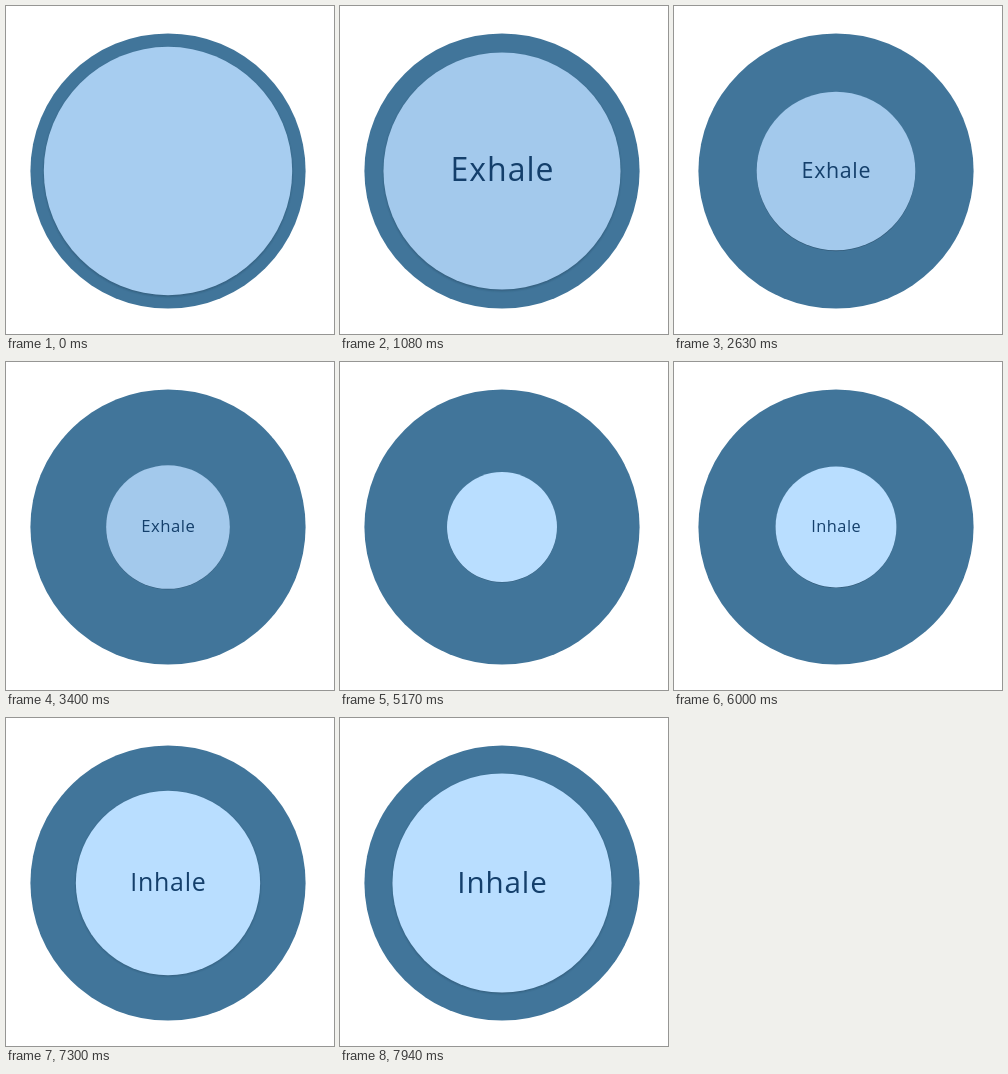
An HTML page for the animation above (8000 ms loop, 328 by 328 pixels).

```html
<!DOCTYPE html>
<html lang="en">
<head>
<meta charset="utf-8">
<title>Breathing circle</title>
<style>
  html, body { margin: 0; width: 100%; height: 100%; overflow: hidden; background: #fff; }
  svg { display: block; width: 100vw; height: 100vh; }
  text { font: 27px "Open Sans", Lato, sans-serif; letter-spacing: .03em; text-anchor: middle; fill: #143f6b; }
</style>
</head>
<body>
<svg viewBox="0 0 328 328">
  <defs>
    <filter id="soft" x="-10%" y="-10%" width="120%" height="120%">
      <feGaussianBlur stdDeviation="1"/>
    </filter>
  </defs>
  <circle cx="162" cy="165" r="137.6" fill="#41759a"/>
  <g id="bubble">
    <circle cy="1" r="100" fill="#123" opacity=".3" filter="url(#soft)"/>
    <circle id="disc" r="100"/>
    <text id="word" x=".4" y="8.8"></text>
  </g>
</svg>
<script>
const LOOP = 8000, MOVE = 4000;
const EXHALE_START = 280, INHALE_START = 5215;
const HOLD = INHALE_START - EXHALE_START - MOVE;
const BIG = 124.2, SMALL = 55;
const EXHALE_COLOR = [163, 201, 236], INHALE_COLOR = [185, 222, 255];

const bubble = document.getElementById("bubble");
const disc = document.getElementById("disc");
const word = document.getElementById("word");

const clamp = v => Math.min(1, Math.max(0, v));
const mix = (a, b, k) => a + (b - a) * k;

// cubic-bezier(.42, 0, .58, 1)
function easeInOut(v) {
  const x = clamp(v);
  let lo = 0, hi = 1;
  for (let i = 0; i < 24; i++) {
    const s = (lo + hi) / 2;
    if (1.26 * s - .78 * s * s + .52 * s * s * s < x) lo = s; else hi = s;
  }
  return lo * lo * (3 - 2 * lo);
}

function draw(t) {
  const inhaling = t >= EXHALE_START + MOVE + HOLD / 2;
  const phase = t - (inhaling ? INHALE_START : EXHALE_START);
  const progress = easeInOut(phase / MOVE);
  const radius = inhaling ? mix(SMALL, BIG, progress) : mix(BIG, SMALL, progress);
  bubble.setAttribute("transform", `translate(162 165) scale(${radius / 100})`);

  // The colour changes during the pause before each breath.
  const toInhale = t < EXHALE_START
    ? 1 - easeInOut((t - EXHALE_START + HOLD) / HOLD)
    : easeInOut((t - EXHALE_START - MOVE) / HOLD);
  const rgb = EXHALE_COLOR.map((c, i) => mix(c, INHALE_COLOR[i], toInhale));
  disc.setAttribute("fill", `rgb(${rgb.map(Math.round)})`);

  word.textContent = inhaling ? "Inhale" : "Exhale";
  const fadeOut = easeInOut((phase - MOVE) / (HOLD / 2));
  word.setAttribute("opacity", easeInOut(phase / 800) * (1 - fadeOut));
}

const start = performance.now();
function tick() {
  draw((performance.now() - start) % LOOP);
  requestAnimationFrame(tick);
}
tick();
</script>
</body>
</html>
```
